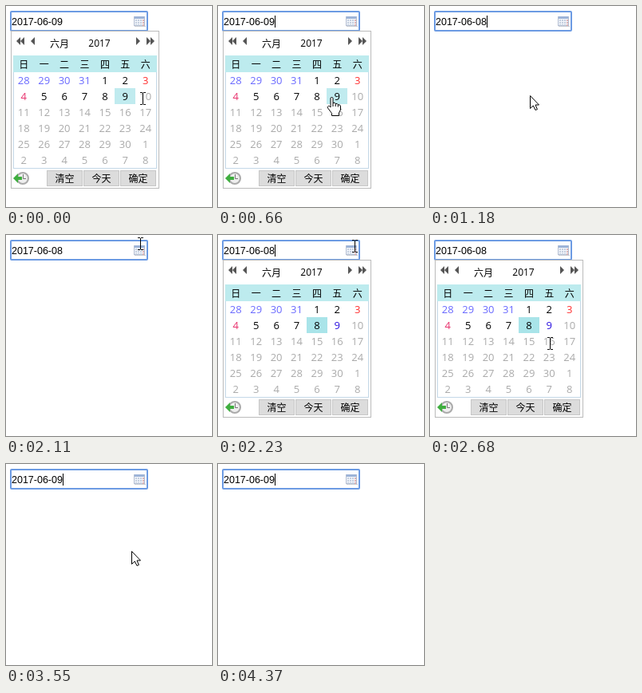
Animation of 258x252 px, one loop 4470 ms. Source, as an HTML page with a canvas:

```html
<!DOCTYPE html>
<html lang="zh">
<head>
<meta charset="utf-8">
<title>日期选择</title>
<style>
html, body { margin: 0; width: 100%; height: 100%; overflow: hidden; background: #fff; }
canvas { display: block; }
</style>
</head>
<body>
<canvas id="stage" width="258" height="252"></canvas>
<script>
const ctx = document.getElementById('stage').getContext('2d');
const LOOP = 4470;
const UI = '"Open Sans", "Noto Sans CJK SC", "Noto Sans CJK", sans-serif';
const COL = 25.4, ROW = 20;

// Pointer steps: start time, shape, hotspot
const steps = [
  [0, 'beam', 171, 116], [150, 'beam', 182, 118], [270, 'beam', 179, 117],
  [420, 'beam', 171, 117], [540, 'hand', 158, 115], [660, 'hand', 143, 114],
  [780, 'hand', 130, 114], [900, 'hand', 123, 113], [1180, 'arrow', 125, 112],
  [1320, 'arrow', 126, 62], [1450, 'beam', 131, 18], [1600, 'beam', 150, 17],
  [1720, 'arrow', 204, 32], [1840, 'arrow', 192, 28], [1960, 'beam', 176, 17],
  [2110, 'beam', 168, 11], [2230, 'beam', 171, 14], [2380, 'beam', 172, 20],
  [2530, 'arrow', 166, 69], [2680, 'beam', 150, 136], [2800, 'beam', 150, 128],
  [2950, 'hand', 152, 121], [3070, 'hand', 153, 117], [3190, 'hand', 154, 113],
  [3430, 'arrow', 154, 114], [3550, 'arrow', 157, 109], [3710, 'arrow', 168, 150],
  [3830, 'arrow', 186, 221], [3970, 'arrow', 209, 240], [4090, 'none', 0, 0]
];

const shapes = {
  arrow: new Path2D('M.5 .5V16.5L4.3 13L7 18.5L9.4 17.5L7 12H11.5Z'),
  hand: new Path2D('M-2 13V1.7Q-2 .5-.5 .5T1 1.7V7.5Q3.5 6.5 4.2 8.5Q6.5 7.7 7.3 9.7Q10.5 9.3 10.5 12V16L8.5 20V23.5H-.5V20.5L-5.2 14.3Q-6.5 12-4.7 11.3Q-3.4 11-2 13M1 7.5V12M4.2 8.5V12M7.3 9.7V12.5'),
  beam: new Path2D('M-3 -7.5H0M1 -7.5H4M-3 7.5H0M1 7.5H4M.5 -7V7')
};

const within = (t, a, b) => t >= a && t < b;

function box(x, y, w, h, fill, line) {
  if (fill) { ctx.fillStyle = fill; ctx.fillRect(x, y, w, h); }
  if (line) { ctx.strokeStyle = line; ctx.lineWidth = 1; ctx.strokeRect(x + .5, y + .5, w - 1, h - 1); }
}

function text(s, x, y, size = 12, color = '#000', align = 'center', family = UI) {
  ctx.font = `${size}px ${family}`;
  ctx.textAlign = align;
  ctx.fillStyle = color;
  ctx.fillText(s, x, y);
}

// Triangle with its tip at x, pointing along dir
function triangle(x, y, dir, size, color) {
  ctx.fillStyle = color;
  ctx.beginPath();
  ctx.moveTo(x, y);
  ctx.lineTo(x - dir * size, y - size);
  ctx.lineTo(x - dir * size, y + size);
  ctx.fill();
}

function field(date, focused, caret) {
  box(6, 7, 171, 24, '#fff', '#999');
  if (focused) {
    ctx.strokeStyle = '#6c9be3';
    ctx.lineWidth = 2;
    ctx.beginPath();
    ctx.roundRect(6, 7, 171, 24, 1);
    ctx.stroke();
  }
  text(date, 7, 24, 12.5, '#000', 'left', '"Liberation Sans", Arial, sans-serif');
  if (caret) box(71, 12, 1, 15, '#000');

  box(160, 13, 14, 12, '#f1f4fa', '#b3bed2');
  box(161, 13, 12, 3, '#9db4d8');
  for (let i = 0; i < 12; i++)
    box(162 + i % 4 * 3, 17 + Math.floor(i / 4) * 3, 2, 2, i % 4 == 3 ? '#dfb4b4' : '#c3cede');
  box(161, 25, 14, 1, '#c8ccd4');
}

function clock() {
  ctx.fillStyle = '#eee';
  ctx.strokeStyle = '#aaa';
  ctx.lineWidth = 2;
  ctx.beginPath();
  ctx.arc(21, 216, 7, 0, 7);
  ctx.fill();
  ctx.stroke();
  ctx.strokeStyle = '#777';
  ctx.lineWidth = 1;
  ctx.stroke(new Path2D('M21.5 211V216.5H25'));
  triangle(9, 216, -1, 6, '#3fae3f');
  box(14, 214, 6, 4, '#3fae3f');
}

function dayColor(i, day, lit) {
  if (i < 4) return '#6a6aff';
  if (i > 12) return '#aaa';
  if (i == 6) return '#ff2f2f';
  if (i == 7) return '#e8336e';
  return day == 9 && !lit ? '#2a10e0' : '#000';
}

function calendar(selected, hover) {
  box(6, 31, 186, 198, '#fff', '#bbb');
  for (const [x, dir] of [[13, -1], [18, -1], [31, -1], [168, 1], [181, 1], [186, 1]])
    triangle(x, 44, dir, 5, '#555');
  text('六月', 67, 52);
  text('2017', 117, 51);

  box(9, 62, 180, 142, '#fff', '#c5d9e8');
  box(9, 62, 180, 21, '#bdebee');
  [...'日一二三四五六'].forEach((s, c) => text(s, 22.3 + c * COL, 78));

  for (let i = 0; i < 42; i++) {
    const day = i < 4 ? 28 + i : (i - 4) % 30 + 1;
    const c = i % 7, r = Math.floor(i / 7);
    const current = i > 3 && i < 34;
    const on = current && day == hover, sel = current && day == selected;
    if (on || sel)
      box(Math.round(9.2 + c * COL), 103 + (r - 1) * ROW, 26, ROW, on ? '#c0ebef' : '#a9e4e9');
    text(day, 22.3 + c * COL, 98 + r * ROW, 13, dayColor(i, day, on || sel));
  }

  clock();
  ['清空', '今天', '确定'].forEach((s, i) => {
    box(51 + i * 46, 206, 45, 20, '#dcdcdc', '#c6c6c6');
    text(s, 73.5 + i * 46, 221);
  });
}

function pointer([, kind, x, y]) {
  const shape = shapes[kind];
  if (!shape) return;
  ctx.save();
  ctx.translate(x, y);
  if (kind != 'beam') { ctx.fillStyle = '#fff'; ctx.fill(shape); }
  ctx.strokeStyle = '#000';
  ctx.lineWidth = 1;
  ctx.stroke(shape);
  ctx.restore();
}

function draw(t) {
  const open = t < 1180 || within(t, 2230, 3430);
  const focused = !within(t, 1060, 1180) && !within(t, 3310, 3430);
  const caret = within(t, 420, 900) || within(t, 1180, 1720) ||
    within(t, 2230, 2680) || within(t, 3430, 3970) || t >= 4370;
  const eighth = within(t, 1180, 3430);
  const hover = t < 780 || t >= 2950 ? 9 : t < 1180 ? 8 : 0;

  box(0, 0, 258, 252, '#fff');
  field(eighth ? '2017-06-08' : '2017-06-09', focused, caret);
  if (open) calendar(eighth ? 8 : 9, hover);
  pointer(steps.findLast(s => s[0] <= t));
}

const start = performance.now();
function frame() {
  draw((performance.now() - start) % LOOP);
  requestAnimationFrame(frame);
}
frame();
</script>
</body>
</html>
```
